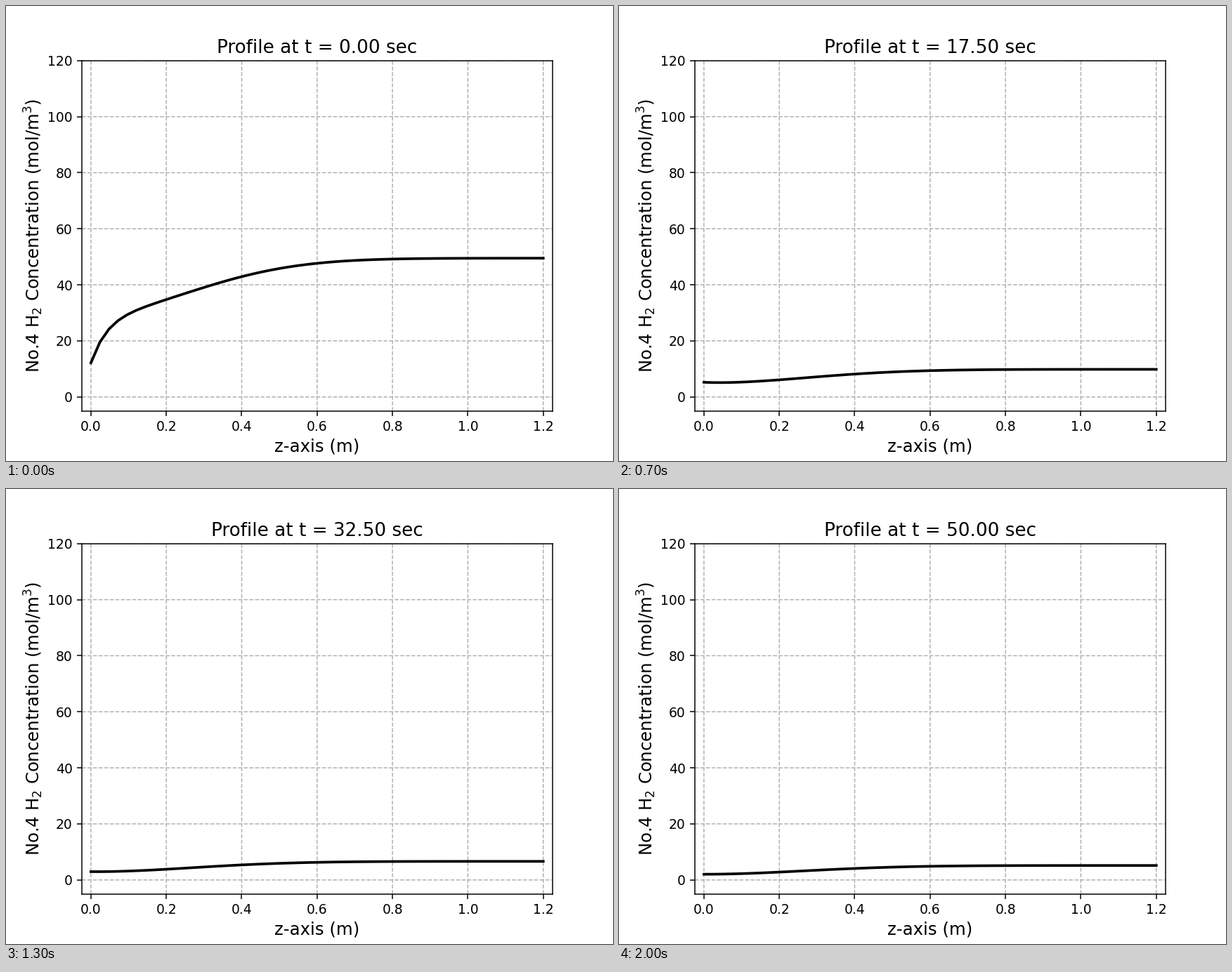
Animation, 864 px wide and 648 px high, one loop 2.1 s. Source, as a matplotlib script:

```python
import numpy as np
import matplotlib.pyplot as plt
from matplotlib.animation import FuncAnimation

FRAMES, INTERVAL, DT = 21, 100, 2.5
LENGTH, NODES = 1.2, 51

z = np.linspace(0, LENGTH, NODES)
rise = 1 - np.exp(-(z / 0.384) ** 1.93)  # S-shaped climb along the bed


def concentration(t):
    closed_end = 1 / (0.0202 + t / (176 + 2.24 * t))
    base = 0.607 - t / (110 + 2.45 * t)
    dip = 0.547 * np.exp(-t - z / 0.051)  # start-up dip at the inlet
    swell = 0.186 * np.exp(-t / 11 - z / 0.065)
    return closed_end * (base + (1 - base) * rise + swell - dip)


plt.rcParams["font.family"] = "DejaVu Sans"
fig, ax = plt.subplots(figsize=(6.4, 4.8), dpi=135)
line, = ax.plot(z, concentration(0), color="black", linewidth=2)
ax.set_xlim(-0.02 * LENGTH, 1.02 * LENGTH)
ax.set_ylim(-5, 120)
ax.set_xlabel("z-axis (m)", fontsize=13, labelpad=3.5)
ax.set_ylabel("No.4 H$_2$ Concentration (mol/m$^3$)", fontsize=13, labelpad=2)
ax.grid(linestyle="--", snap=False)
title = ax.set_title("", fontsize=14)


def update(frame):
    t = frame * DT
    line.set_ydata(concentration(t))
    title.set_text(f"Profile at t = {t:.2f} sec")
    return line, title


anim = FuncAnimation(fig, update, frames=FRAMES, interval=INTERVAL,
                     repeat=True, repeat_delay=0, blit=False)
plt.show()
```
